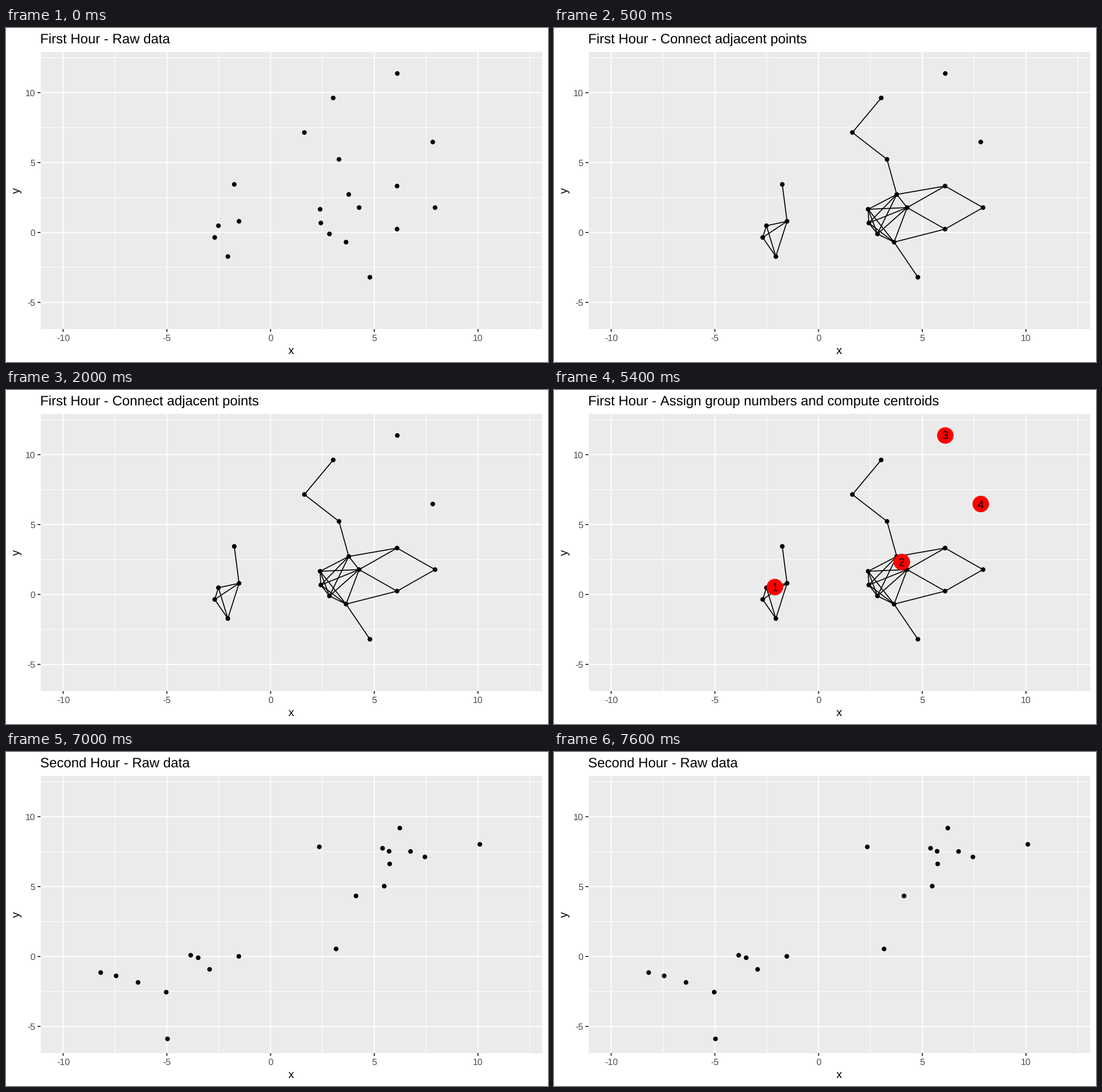
A matplotlib script that plays this animation: 952x588 px, repeating every 8 s.

```python
import matplotlib.pyplot as plt
import numpy as np
from matplotlib.animation import FuncAnimation
from matplotlib.patches import Circle, Rectangle

plt.rcParams["font.family"] = "Liberation Sans"
plt.rcParams["text.hinting"] = "none"
plt.rcParams["text.kerning_factor"] = 6

W, H, DPI = 952, 588, 64
PT = 72 / DPI  # points per pixel
LEFT, RIGHT, TOP, BOTTOM = 60.5, 942, 42.3, 530
ORIGIN = np.array([464.7, 360])
UNIT = np.array([36.43, -24.62])  # pixels per data unit
REACH = 3  # points closer than this are connected
STEP = 500

fig = plt.figure(figsize=(W / DPI, H / DPI), dpi=DPI, facecolor="white")
ax = fig.add_axes([0, 0, 1, 1])
ax.set_xlim(0, W)
ax.set_ylim(H, 0)
ax.axis("off")


def to_px(p):
    return ORIGIN + np.asarray(p) * UNIT


def bend(start, pull, end, n=4):
    """Evenly timed points on a quadratic curve."""
    t = np.linspace(0, 1, n)[:, None]
    start, pull, end = map(np.array, (start, pull, end))
    return (1 - t) ** 2 * start + 2 * t * (1 - t) * pull + t ** 2 * end


def ring(center, radii, n=4):
    a = np.arange(n) * 2 * np.pi / n
    return np.array(center) + np.column_stack([np.cos(a), np.sin(a)]) * radii


def first_hour():
    loners = [(6.11, 11.37), (7.82, 6.47)]
    tail = [(3.02, 9.62), (1.63, 7.15), (3.3, 5.23), (3.77, 2.72)]
    tips = [(4.79, -3.2), (-1.75, 3.44)]
    left = bend((-2.06, -1.72), (-3.62, 0.72), (-1.52, 0.8))
    core = bend((2.39, 1.66), (2.15, 0.04), (3.64, -0.69))
    diamond = ring((6.1, 1.78), (1.83, 1.54))
    return np.vstack([loners, tail, tips, left, core, diamond])


def second_hour():
    low = [(-4.97, -5.89), (-3.85, 0.09), (-3.49, -0.09), (-2.94, -0.92),
           (-1.53, 0.01)]
    middle = [(3.16, 0.54), (4.12, 4.33), (2.35, 7.84)]
    high = [(6.23, 9.18), (6.75, 7.51), (7.44, 7.12), (10.09, 8.02)]
    slope = bend((-8.19, -1.15), (-7.3, -1.33), (-5.03, -2.55))
    hook = bend((5.48, 5.03), (6.09, 7.93), (5.4, 7.74))
    return np.vstack([low, middle, high, slope, hook])


def line(x1, y1, x2, y2, color, width, z):
    return ax.plot([x1, x2], [y1, y2], color=color, lw=width * PT, zorder=z,
                   solid_capstyle="butt", snap=False)[0]


def label(x, y, text, size, color="black", ha="center", **kw):
    return ax.text(x, y, text, fontsize=size * PT, color=color, ha=ha,
                   va="baseline", **kw)


def dot(p, radius, color, z):
    return ax.add_patch(Circle(p, radius, fc=color, ec="none", zorder=z))


def draw_panel():
    ax.add_patch(Rectangle((LEFT, TOP), RIGHT - LEFT, BOTTOM - TOP,
                           fc="#EBEBEB", ec="none", zorder=0))
    for v in np.arange(-10, 13, 2.5):
        x, y = to_px((v, v))
        major = v % 5 == 0
        width = 1.9 if major else 0.95
        inside = TOP < y < BOTTOM
        line(x, TOP, x, BOTTOM, "white", width, 1 + major)
        if inside:
            line(LEFT, y, RIGHT, y, "white", width, 1 + major)
        if major:
            line(x, BOTTOM, x, BOTTOM + 5, "#333333", width, 2)
            label(x, 550.8, f"{v:.0f}", 16, "#4D4D4D")
        if major and inside:
            line(LEFT - 5, y, LEFT, y, "#333333", width, 2)
            label(51.6, y + 5.8, f"{v:.0f}", 16, "#4D4D4D", ha="right")
    label((LEFT + RIGHT) / 2, 573.8, "x", 20)
    label(24, (TOP + BOTTOM) / 2, "y", 20, rotation=90, rotation_mode="anchor")


def find_groups(near):
    """Connected groups of an adjacency matrix."""
    reach = np.linalg.matrix_power(near.astype(float), len(near)) > 0
    return np.unique(reach, axis=0)


draw_panel()
title = label(LEFT, 27.2, "", 23.95, ha="left")

points = first_hour()
gaps = points[:, None] - points
near = np.hypot(gaps[..., 0], gaps[..., 1]) < REACH

first_dots = [dot(to_px(p), 4.1, "black", 4) for p in points]
second_dots = [dot(to_px(p), 4.1, "black", 4) for p in second_hour()]
edges = [line(*to_px(points[i]), *to_px(points[j]), "black", 1.7, 3)
         for i, j in np.argwhere(np.triu(near, 1))]

badges = []
centroids = sorted(tuple(points[g].mean(axis=0)) for g in find_groups(near))
for n, center in enumerate(centroids, 1):
    x, y = to_px(center)
    badges += [dot((x, y), 14.5, "red", 5),
               label(x, y + 7.2, str(n), 20, zorder=6)]

# Start time, title, visible parts
STAGES = [
    (0, "First Hour - Raw data", [first_dots]),
    (500, "First Hour - Connect adjacent points", [first_dots, edges]),
    (3000, "First Hour - Assign group numbers and compute centroids",
     [first_dots, edges, badges]),
    (7000, "Second Hour - Raw data", [second_dots]),
]


def update(frame):
    _, text, shown = [s for s in STAGES if s[0] <= frame * STEP][-1]
    title.set_text(text)
    for part in (first_dots, second_dots, edges, badges):
        visible = any(part is s for s in shown)
        for artist in part:
            artist.set_visible(visible)
    return []


anim = FuncAnimation(fig, update, frames=16, interval=STEP, repeat=True,
                     repeat_delay=0, blit=False)
plt.show()
```
